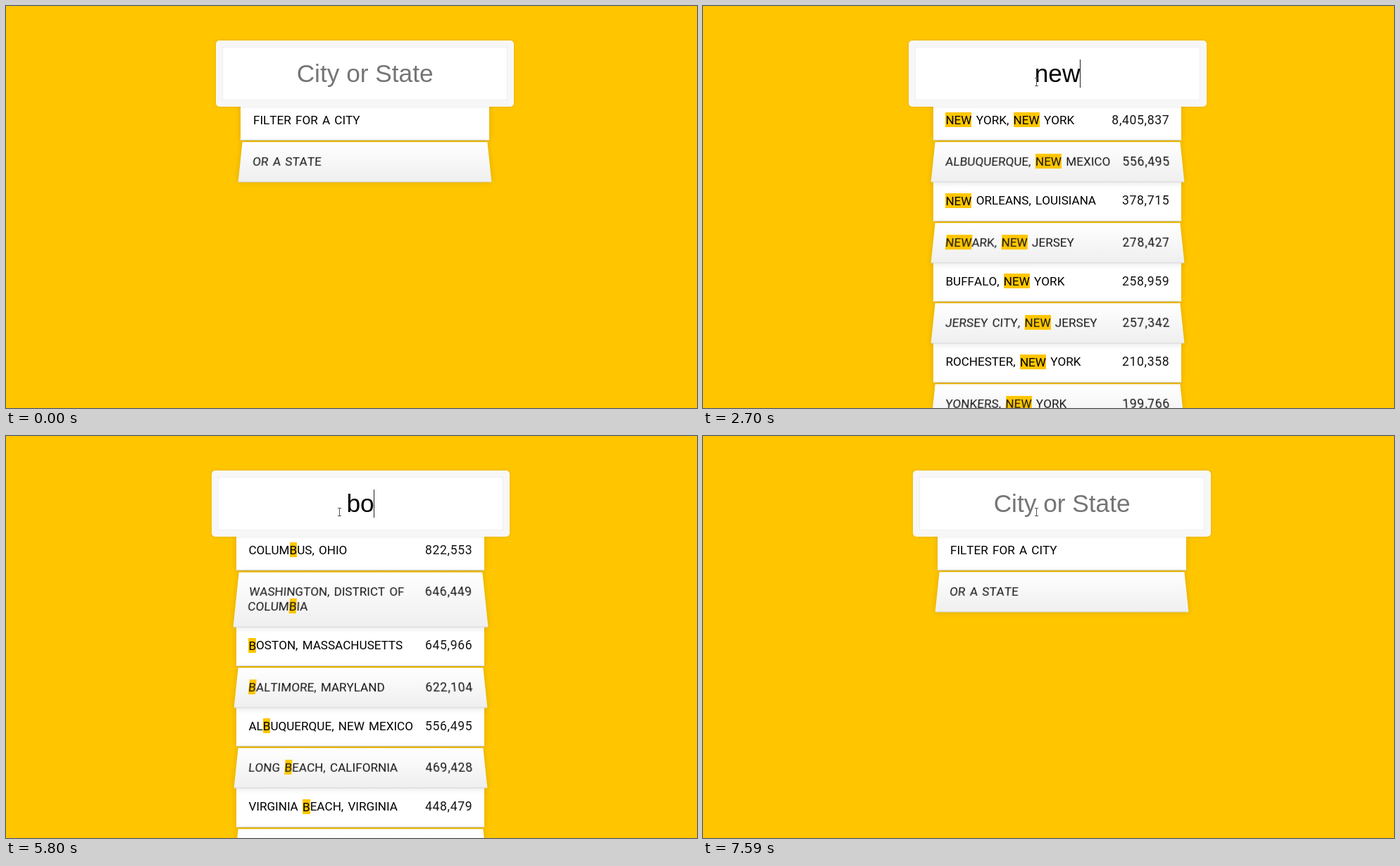
Recreate the animation shown at these times as an HTML page. Size 981 by 571 pixels, loop 8000 ms.

```html
<!DOCTYPE html>
<html lang="en">
<head>
<meta charset="utf-8">
<style>
  html, body { margin: 0; width: 100%; height: 100%; overflow: hidden; background: #ffc600; }
  #stage { position: relative; width: 100%; height: 100%; overflow: hidden; contain: strict; }
  #form { position: absolute; top: 0; width: 352.5px; }
  #search {
    position: absolute; z-index: 1; top: 49px; left: -35.25px; width: 423px; height: 94px;
    box-sizing: border-box; border: 9px solid #f7f7f7; border-radius: 5px; background: #fff;
    box-shadow: 0 0 4.4px rgba(0,0,0,.12), inset 0 0 2px rgba(0,0,0,.22);
    font: 35.25px/40px "Liberation Sans", Arial, sans-serif;
  }
  #search div { position: absolute; inset: 0; display: flex; align-items: center; justify-content: center; }
  #hint { color: #757575; }
  #typed { position: relative; min-width: 1px; height: 40px; color: #000; }
  #caret { position: absolute; left: 100%; top: 0; width: 1px; height: 40px; margin-left: -.55px; background: #222; }
  ul { position: absolute; top: 134.1px; left: 0; width: 100%; margin: 0; padding: 0; list-style: none; }
  li {
    display: flex; justify-content: space-between; padding: 17.6px;
    border-bottom: 1px solid #d8d8d8; background: #fff; box-shadow: 0 0 8.8px rgba(0,0,0,.14);
    font: 17.1px/21.05px Roboto, sans-serif; font-kerning: none; word-spacing: 2px;
    text-transform: uppercase; color: #000;
  }
  li:nth-child(even) {
    transform: perspective(88px) rotateX(3deg) translateY(1.8px) scale(1.001);
    background: linear-gradient(#fff, #efefef); color: #151515;
  }
  li b { font-weight: 400; padding: .5px 0; background: #ffc600; }
  li i { font-style: normal; font-size: 17.6px; white-space: nowrap; letter-spacing: .65px; margin-right: -.65px; color: #151515; }
  svg { position: absolute; z-index: 2; left: 0; top: 0; width: 14px; height: 22px; overflow: visible; }
</style>
</head>
<body>
<div id="stage">
  <div id="form">
    <div id="search">
      <div id="hint">City or State</div>
      <div><span id="typed"><span id="word"></span><span id="caret"></span></span></div>
    </div>
    <ul id="list"></ul>
  </div>
  <svg id="pointer">
    <path id="arrow" d="M0 0V16L4 12.5 6.5 18 9 17 6.5 11.5H11.5Z" fill="#fff" stroke="#000"/>
    <path id="beam" d="M-2.5 -5.5H2.5M0 -5.5V5.5M-2.5 5.5H2.5" fill="none" stroke="#555"/>
  </svg>
</div>
<script>
const $ = id => document.getElementById(id);

// Rows shown for each query: place, then population
const rows = {
  "": ["Filter for a city", "or a state"],
  n: ["New York, New York|8,405,837", "Los Angeles, California|3,884,307", "Chicago, Illinois|2,718,782",
    "Houston, Texas|2,195,914", "Philadelphia, Pennsylvania|1,553,165", "Phoenix, Arizona|1,513,367",
    "San Antonio, Texas|1,409,019", "San Diego, California|1,355,896"],
  ne: ["New York, New York|8,405,837", "Memphis, Tennessee|653,450", "Nashville-Davidson, Tennessee|634,464",
    "Las Vegas, Nevada|603,488", "Albuquerque, New Mexico|556,495", "Omaha, Nebraska|434,353",
    "Minneapolis, Minnesota|400,070", "New Orleans, Louisiana|378,715"],
  new: ["New York, New York|8,405,837", "Albuquerque, New Mexico|556,495", "New Orleans, Louisiana|378,715",
    "Newark, New Jersey|278,427", "Buffalo, New York|258,959", "Jersey City, New Jersey|257,342",
    "Rochester, New York|210,358", "Yonkers, New York|199,766"],
  b: ["Columbus, Ohio|822,553", "Washington, District of Columbia|646,449", "Boston, Massachusetts|645,966",
    "Baltimore, Maryland|622,104", "Albuquerque, New Mexico|556,495", "Long Beach, California|469,428",
    "Virginia Beach, Virginia|448,479", "Bakersfield, California|363,630"],
  bo: ["Boston, Massachusetts|645,966", "Greensboro, North Carolina|279,639", "Lubbock, Texas|239,538",
    "Boise City, Idaho|214,237", "Murfreesboro, Tennessee|117,044", "Boulder, Colorado|103,166",
    "Hillsboro, Oregon|97,368", "Bolingbrook, Illinois|73,936"],
  bos: ["Boston, Massachusetts|645,966", "Bossier City, Louisiana|66,333"]
};

// [start ms, typed text, query of the list, caret visible]
const steps = [
  [0, "", "", 0], [1220, "", "", 1], [1750, "", "", 0], [2230, "", "", 1],
  [2380, "n", "", 1], [2530, "ne", "n", 1], [2610, "new", "ne", 1], [2700, "new", "new", 1],
  [3160, "new", "new", 0], [3710, "new", "new", 1],
  [4170, "ne", "new", 1], [4250, "ne", "ne", 1], [4330, "ne", "ne", 0], [4410, "n", "n", 1],
  [4560, "", "n", 0], [4650, "", "", 0], [4790, "", "", 1], [5250, "", "", 0],
  [5650, "b", "", 1], [5800, "bo", "b", 1], [5880, "bos", "bo", 1], [5960, "bos", "bos", 1],
  [6490, "bos", "bos", 0], [7040, "bos", "bos", 1], [7120, "bo", "bos", 1], [7200, "bo", "bo", 1],
  [7350, "b", "bo", 1], [7430, "b", "b", 1], [7510, "", "b", 0], [7590, "", "", 0]
];

const mark = (text, query) => query ? text.replace(new RegExp(query, "gi"), "<b>$&</b>") : text;

let shown;
function showList(query) {
  if (query === shown) return;
  shown = query;
  $("list").innerHTML = rows[query].map(row => {
    const [place, count] = row.split("|");
    return `<li><span>${mark(place, query)}</span>${count ? `<i>${count}</i>` : ""}</li>`;
  }).join("");
  // A long list brings a scrollbar, which moves the centre to the left
  $("form").style.left = (rows[query].length > 2 ? 326.8 : 333.4) + "px";
}

// Progress in hops of 77 ms, easing out
function hop(t, start, count) {
  const p = Math.max(0, Math.min(1, Math.floor((t - start) / 77 + .05) / count));
  return 1 - (1 - p) ** 2;
}

function movePointer(t) {
  const a = hop(t, 360, 3), b = hop(t, 683, 6);
  const x = 822 - 338.5 * a - 10 * b - 5 * Math.sin(Math.PI * b);
  const y = 550 - 394.5 * a - 47 * b;
  $("pointer").style.display = t < 360 ? "none" : "block";
  $("pointer").style.transform = `translate(${Math.floor(x) + .5}px, ${Math.floor(y)}px)`;
  $("arrow").style.display = a < 1 ? "" : "none";
  $("beam").style.display = a < 1 ? "none" : "";
}

function draw(now) {
  const t = now % 8000;
  const [, text, query, caret] = steps.findLast(step => step[0] <= t);
  $("word").textContent = text;
  $("hint").style.visibility = text ? "hidden" : "visible";
  $("caret").style.visibility = caret ? "visible" : "hidden";
  showList(query);
  movePointer(t);
  requestAnimationFrame(draw);
}
draw(0);
</script>
</body>
</html>
```
